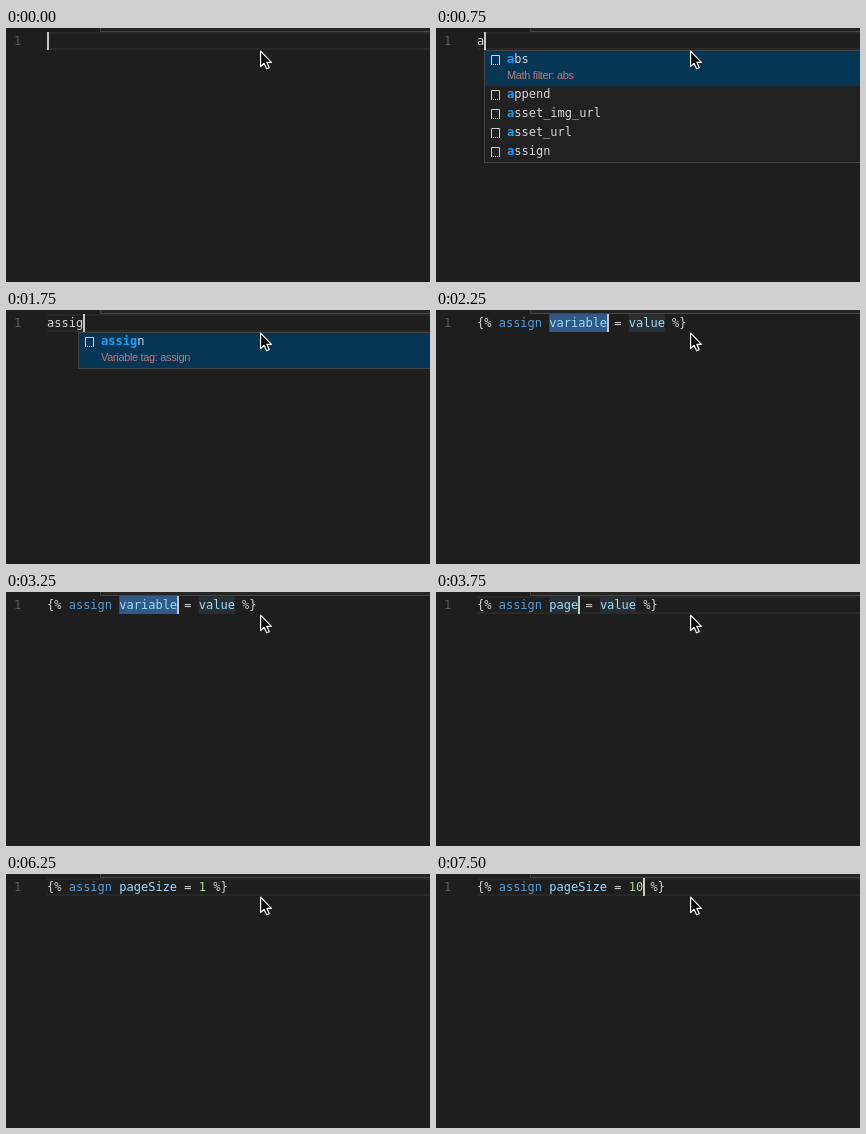
An HTML page for the animation above (8000 ms loop, 424 by 254 pixels).

```html
<!DOCTYPE html>
<html lang="en">
<head>
<meta charset="utf-8">
<title>Snippet completion</title>
<style>
  html, body { margin: 0; width: 100%; height: 100%; overflow: hidden; background: #1e1e1e; }
  svg { display: block; width: 424px; height: 254px; }
  text { white-space: pre; font: 12px "DejaVu Sans Mono", monospace; fill: #d4d4d4; }
  .match { font-weight: bold; fill: #18a0f2; }
  .detail { font: 11px "Liberation Sans", Arial, sans-serif; letter-spacing: -.34px; fill: #b9797b; }
</style>
</head>
<body>
<svg viewBox="0 0 424 254">
  <rect width="424" height="254" fill="#1e1e1e"/>
  <path id="line" d="M41 5H424M41 21H424" stroke="#282828" stroke-width="2"/>
  <path d="M94.5 -1V3.5H425V-1Z" fill="#252526" stroke="#454545"/>
  <text x="8" y="17" style="fill:#5a5a5a">1</text>
  <g id="marks"></g>
  <text id="code" x="41" y="17"></text>
  <g id="popup"></g>
  <rect id="caret" y="4" width="2" height="18" fill="#c8c8c6"/>
  <path d="M254.6 23.2V38.6L258.1 35.3L260.6 40.8L263.2 39.6L260.8 34.3H265.4Z" fill="#000" stroke="#fff" stroke-width="1.2" stroke-linejoin="round"/>
</svg>
<script>
const LOOP = 8000, LEFT = 41, CHAR = 7.224;
const el = id => document.getElementById(id);
const xAt = col => LEFT + col * CHAR;
const assign = (name, value) => `{% assign ${name} = ${value} %}`;

// Rows are [label, matched prefix length]; only the first one shows its detail.
const list = (x, detail, ...rows) => ({ x, detail, rows });
const urls = n => [["asset_img_url", n], ["asset_url", n], ["assign", n]];

// Each step replaces only the properties it names.
const steps = [
  { at: 0, code: "", col: 0, caret: true, line: true },
  { at: 250, caret: false },
  { at: 750, code: "a", col: 1, caret: true,
    popup: list(48, "Math filter: abs", ["abs", 1], ["append", 1], ...urls(1)) },
  { at: 1000, code: "as", col: 2, popup: list(55, "URL filter: asset img url", ...urls(2)) },
  { at: 1250, code: "ass", col: 3, popup: list(63, "URL filter: asset img url", ...urls(3)) },
  { at: 1500, code: "assi", col: 4,
    popup: list(68, "Variable tag: assign", ["assign", 4], ["asset_img_url", 3]) },
  { at: 1750, code: "assig", col: 5, popup: list(72, "Variable tag: assign", ["assign", 5]) },
  { at: 2000, code: "assign", col: 6, popup: list(84, "Variable tag: assign", ["assign", 6]) },
  { at: 2250, code: assign("variable", "value"), col: 18, popup: null,
    selected: "variable", fields: ["value"], line: false },
  { at: 2750, caret: false },
  { at: 3250, caret: true },
  { at: 3500, code: assign("pa", "value"), col: 12, selected: null, fields: ["pa ", "value"],
    line: true, popup: list(128, "Theme tag: paginate", ["paginate", 2]) },
  { at: 3750, code: assign("page", "value"), col: 14, fields: ["page", "value"], popup: null },
  { at: 4250, code: assign("pageSi", "value"), col: 16, fields: ["pageSi", "value"] },
  { at: 4500, code: assign("pageSiz", "value"), col: 17, fields: ["pageSiz", "value"] },
  { at: 4750, code: assign("pageSize", "value"), col: 18, fields: ["pageSize", "value"] },
  { at: 5000, col: 26, selected: "value", fields: [] },
  { at: 5500, caret: false },
  { at: 5750, code: assign("pageSize", "1"), col: 22, caret: true, selected: null },
  { at: 6250, caret: false },
  { at: 6500, code: assign("pageSize", "10"), col: 23, caret: true },
  { at: 7000, caret: false },
  { at: 7500, caret: true }
];

const states = [];
for (const step of steps) states.push({ fields: [], ...states[states.length - 1], ...step });

function color(token) {
  if (token === "assign") return "#569cd6";
  if (/^\d/.test(token)) return "#b5cea8";
  return /^\w/.test(token) ? "#9cdcfe" : "#d4d4d4";
}

function codeMarkup(code) {
  if (!code.startsWith("{")) return code;
  return code.replace(/\w+|\W+/g, t => `<tspan style="fill:${color(t)}">${t}</tspan>`);
}

function mark(code, word, fill) {
  const text = word.trim();
  return `<rect x="${xAt(code.indexOf(word))}" y="4" width="${text.length * CHAR}" height="18" fill="${fill}"/>`;
}

function icon(x, y) {
  return `<path d="M${x + .5} ${y + 9}V${y + .5}H${x + 8.5}V${y + 9}" fill="none" stroke="#d0d0d0"/>
    <path d="M${x} ${y + 9.5}H${x + 9}" stroke="#d0d0d0" stroke-dasharray="1 1"/>`;
}

function popupMarkup({ x, detail, rows }) {
  const height = 37 + 19 * (rows.length - 1);
  const items = rows.map(([label, n], i) => {
    const y = i ? 51 + 19 * i : 35;
    return icon(x + 7, y - 8) + `<text x="${x + 23}" y="${y}">` +
      `<tspan class="match">${label.slice(0, n)}</tspan>${label.slice(n)}</text>`;
  }).join("");
  return `<rect x="${x + .5}" y="22.5" width="430" height="${height - 1}" fill="#212121" stroke="#454545"/>
    <rect x="${x + 1}" y="23" width="430" height="35" fill="#073655"/>
    ${items}<text class="detail" x="${x + 23}" y="51">${detail}</text>`;
}

let shown;
function draw(time) {
  const state = states.filter(s => s.at <= time).pop();
  if (state === shown) return;
  shown = state;
  const { code, col, caret, line, selected, fields, popup } = state;
  el("line").style.display = line ? "" : "none";
  el("marks").innerHTML = fields.map(f => mark(code, f, "#2a2e31")).join("") +
    (selected ? mark(code, selected, "#32588a") : "");
  el("code").innerHTML = codeMarkup(code);
  el("popup").innerHTML = popup ? popupMarkup(popup) : "";
  el("caret").setAttribute("x", Math.round(xAt(col)));
  el("caret").style.display = caret ? "" : "none";
}

const start = performance.now();
function tick() {
  draw((performance.now() - start) % LOOP);
  requestAnimationFrame(tick);
}
tick();
</script>
</body>
</html>
```
